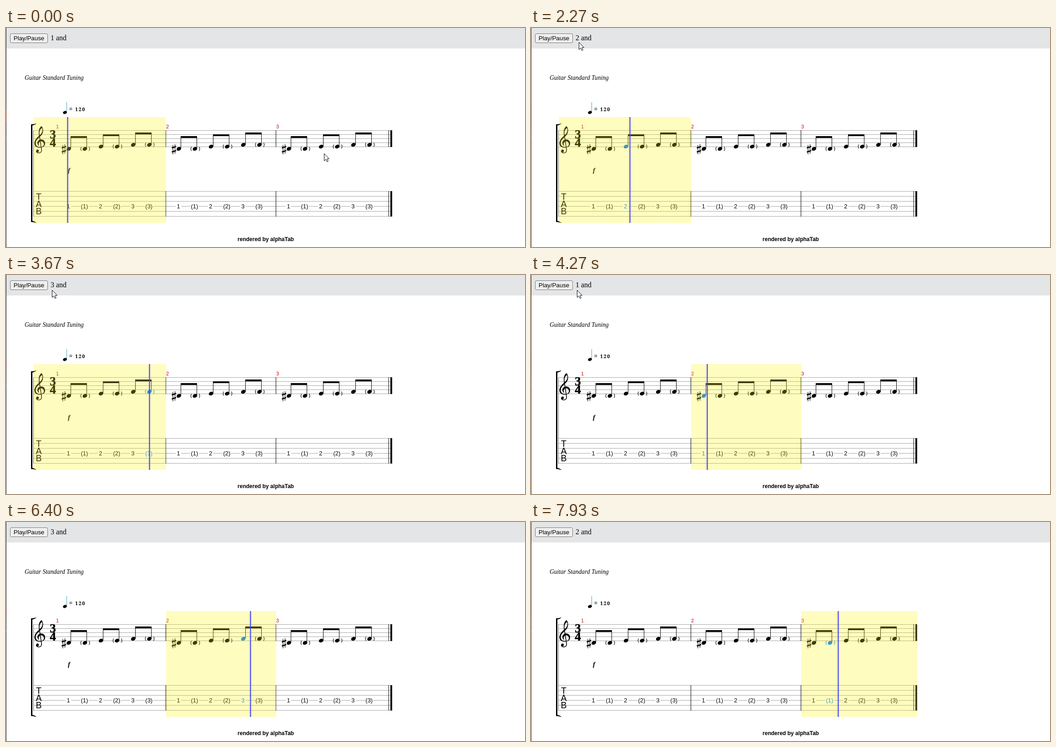
These frames come from a looping animation (1141 by 482 pixels, 8 s). An HTML page:

```html
<!DOCTYPE html>
<html lang="en">
<head>
<meta charset="utf-8">
<title>Score player</title>
<style>
  html, body { margin: 0; width: 100%; height: 100%; overflow: hidden; background: #fff; }
  svg { display: block; width: 1141px; height: 482px; }
  rect { shape-rendering: crispEdges; }
  .sans { font-family: "Liberation Sans", Arial, sans-serif; }
  .serif { font-family: "Liberation Serif", "Times New Roman", serif; }
  .mid { text-anchor: middle; }
  .num { font-size: 13px; }
  .line { fill: #a5a5a5; }
  .barno { font-size: 11px; fill: #c80000; }
  .paren { fill: none; stroke: #000; stroke-width: 1.1; }
  .on .head, .on .num { fill: #0078ff; }
  .on .paren { stroke: #0078ff; }
  #btn { fill: #efefef; stroke: #767676; shape-rendering: auto; }
  #btn.hover { fill: #e5e5e5; stroke: #4f4f4f; }
  #btn.active { fill: #f5f5f5; stroke: #8d8d8d; }
  #bar { fill: rgba(255, 242, 0, .25); }
  #beat { fill: rgba(64, 64, 255, .75); }
</style>
</head>
<body>
<svg id="stage" viewBox="0 0 1141 482"></svg>
<script>
const LOOP = 8000, STEP = 200 / 3, BAR_W = 242;

const rect = (x, y, w, h, attrs = '') => `<rect x="${x}" y="${y}" width="${w}" height="${h}" ${attrs}/>`;
const text = (x, y, str, attrs) => `<text x="${x}" y="${y}" ${attrs}>${str}</text>`;

const staffYs = [225, 234, 243, 252, 261];
const tabYs = [359, 370, 381, 392, 403, 414];
const barline = (x, w = 1) => rect(x, 225, w, 37) + rect(x, 359, w, 56);

function header() {
  return rect(0, 0, 1141, 45, 'fill="#e4e5e7"') +
    rect(0, 0, 1, 482, 'fill="#3c3c3c"') +
    rect(0, 181, 1, 25, 'id="edge"') +
    rect(0, 239, 1, 3, 'fill="#2c6cb0"') +
    '<rect id="btn" x="9.5" y="12.5" width="82" height="20" rx="2.5"/>' +
    text(50.5, 27, 'Play/Pause', 'class="sans mid" font-size="13.333"') +
    text(98, 27, '1 and', 'id="count" class="serif" font-size="16"');
}

function titles() {
  return text(41, 114, 'Guitar Standard Tuning', 'class="serif" font-size="13.55" font-style="italic"') +
    '<ellipse cx="129.6" cy="185.8" rx="4.4" ry="3.2" transform="rotate(-25 129.6 185.8)"/>' +
    rect(133, 163, 1, 22, 'fill="#45a0c4"') +
    '<g font-family="\'Noto Serif\', serif" font-weight="700">' +
    text(138.5, 183, '=', 'font-size="14"') +
    text(152, 183, '120', 'font-size="10.8" letter-spacing="1.6"') + '</g>' +
    text(571, 469, 'rendered by alphaTab', 'class="sans mid" font-size="12" font-weight="700"');
}

function system() {
  const lines = [...staffYs, ...tabYs].map(y => rect(61, y, 788, 1, 'class="line"')).join('');
  const tab = ['T', 'A', 'B'].map((c, i) =>
    text(72, 378 + 16 * i, c, 'class="sans mid" font-size="19.5"')).join('');
  const sig = ['3', '4'].map((c, i) =>
    text(103, 243 + 18 * i, c, 'class="serif mid" font-size="27" font-weight="700" stroke="#000" stroke-width=".5"')).join('');
  return lines +
    rect(60, 225, 1, 190, 'fill="#666"') +
    '<path d="M55 212C60 212 64 211 67 209.5C65 212.500 62 214 58 214.500V424.500C62 425 65 426.500 67 429.500C64 428 60 427 55 427Z"/>' +
    barline(351) + barline(593) + barline(841) + barline(845, 4) +
    clef() + sig + tab +
    text(136, 318, 'f', 'class="serif" font-size="15" font-weight="700" font-style="italic"');
}

function clef() {
  return `<path fill-rule="evenodd" d="M78 216C74.500 218 71.500 224 72 231C72.200 233 72.600 236 72.800 237
    C67 242 62.500 247.500 62.500 254C62.500 260 67.500 263.500 74 263.500C81 263.500 86 260 86 254
    C86 249 82.300 245.200 77.500 245.200C72.300 245.200 69 249 69 253C69 256.500 71 259 74 260
    C72.600 258.600 71.800 257 71.800 255C71.800 251.800 74.200 249.400 77.200 249.400
    C81 249.400 83.300 252 83.300 255.500C83.300 259.500 80 262.200 75 262.200
    C69.500 262.200 65.300 258.600 65.300 253.500C65.300 248 69.500 244 74 240
    C79 235.500 81.500 231.500 81.500 225.500C81.500 221.500 80.300 218 78 216Z
    M78.900 220.500C75.500 222 73.600 226.500 73.600 230.500C73.600 232.500 73.800 234 74.200 235.800
    C78 232.500 80 228.500 80 224.500C80 222.500 79.800 221 78.900 220.500Z"/>
    <path d="M73 234L78 267C78.800 272 76.500 275 72.500 275C69.500 275 67 273.500 66.500 271" fill="none" stroke="#000" stroke-width="1.6"/>
    <circle cx="69.300" cy="270.300" r="2.900"/>`;
}

function note(i) {
  const x = 138 + 35.45 * i, y = [266, 261, 257][i >> 1], ghost = i % 2;
  const nx = x - 1, fret = 1 + (i >> 1), gap = ghost ? 9.5 : 6;
  const parens = `<path class="paren" d="M${x - 7.6} ${y - 4.5}q-3 4.500 0 9M${x + 9} ${y - 4.5}q3 4.500 0 9"/>`;
  return '<g class="note">' +
    `<ellipse class="head" cx="${x}" cy="${y}" rx="5.200" ry="3.900" transform="rotate(-25 ${x} ${y})"/>` +
    (ghost ? parens : '') +
    rect(nx - gap, 386, gap * 2, 13, 'fill="#fff"') +
    text(nx, 397, ghost ? `(${fret})` : fret, 'class="sans mid num"') + '</g>';
}

function measure(n) {
  let out = `<g transform="translate(${BAR_W * n})">` +
    text(110, 221, n + 1, 'class="sans barno"') +
    '<path d="M125 257.500V278M129.500 256V276.500" stroke="#000" stroke-width="1.2"/>' +
    '<path d="M122.500 264L132 260.800M122.500 273L132 269.800" stroke="#000" stroke-width="2.700"/>';
  for (let g = 0; g < 3; g++) {
    const x = 142 + 71 * g, top = 238 - 4 * g, end = [265, 260, 256][g];
    out += rect(x, top, 1, end - top) + rect(x + 35, top, 1, end - top) + rect(x, top, 36, 4);
  }
  for (let i = 0; i < 6; i++) out += note(i);
  return out + '</g>';
}

const $ = id => document.getElementById(id);
$('stage').innerHTML = header() + titles() + system() + [0, 1, 2].map(measure).join('') +
  rect(61, 196, 291, 233, 'id="bar"') + rect(134, 196, 3, 233, 'id="beat"') +
  '<path id="mouse" fill="#fff" stroke="#000" d="M.5 .5V16.500L4.200 13L6.700 18.500L9.200 17.400L6.900 12H11.500Z"/>';
const notes = [...document.querySelectorAll('.note')];

// Start time of each eighth note
const beats = [1130, 1610, 2120, 2625, 3120, 3590, 4110, 4590, 5075, 5600, 6140, 6650, 7110, 7625];
const beatPath = [[1090, 134], [1867, 188], [2267, 216], [3600, 311], [3667, 314], [4130, 376],
  [5200, 456], [5333, 463.5], [6200, 523], [6400, 536], [6655, 553.5], [7067, 613.5], [7115, 618], [7933, 674], [8000, 678.5]];
const mousePath = [[0, 699, 276], [733, 74, 28], [1900, 74, 28], [2200, 105, 31], [2800, 105, 31], [3500, 101, 33]];
const bars = [[61, 291], [352, 242], [594, 255]];

const linear = u => u, smooth = u => u * u * (3 - 2 * u);

function along(path, t, ease) {
  if (t <= path[0][0]) return path[0].slice(1);
  const i = path.findIndex(p => p[0] > t);
  if (i < 0) return path[path.length - 1].slice(1);
  const a = path[i - 1], b = path[i], u = ease((t - a[0]) / (b[0] - a[0]));
  return a.slice(1).map((v, k) => v + (b[k + 1] - v) * u);
}

function draw(t) {
  const now = beats.filter(b => b <= t).length - 1;
  notes.forEach((n, i) => n.classList.toggle('on', i === now));

  const [x, w] = bars[Math.max(0, Math.floor(now / 6))];
  $('bar').setAttribute('x', x);
  $('bar').setAttribute('width', w);
  $('beat').setAttribute('x', Math.round(along(beatPath, t, linear)[0]));

  // The count runs slightly ahead of the cursor
  const count = Math.max(0, Math.floor((t - 860) / 1000)) % 3 + 1;
  $('count').textContent = count + ' and';

  const [mx, my] = along(mousePath, t, smooth).map(Math.round);
  $('mouse').setAttribute('transform', `translate(${mx} ${my})`);
  $('mouse').style.display = t < 4450 ? '' : 'none';

  const over = mx >= 9 && mx < 92 && my >= 12 && my < 33;
  const pressed = t > 925 && t < 1060;
  $('btn').setAttribute('class', pressed ? 'active' : over ? 'hover' : '');
  $('edge').setAttribute('fill', t < 925 ? '#a8382c' : '#5e2020');
}

const start = performance.now();
function tick() {
  const t = (performance.now() - start) % LOOP;
  draw(Math.floor((t + 4) / STEP) * STEP);
  requestAnimationFrame(tick);
}
tick();
</script>
</body>
</html>
```
